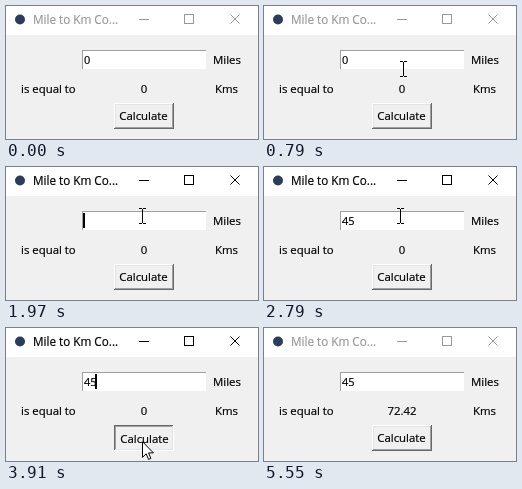
An HTML page for the animation above (5.67 s loop, 252x133 px).

```html
<!DOCTYPE html>
<html lang="en">
<head>
<meta charset="utf-8">
<title>Mile to Km Converter</title>
<style>
  html, body { margin: 0; width: 100%; height: 100%; overflow: hidden; background: #f0f0f0; }
  svg { display: block; width: 100vw; height: 100vh; }
  text { font: 11.4px "Open Sans", "Noto Sans", sans-serif; fill: #000; stroke: #000; stroke-width: .2px; }
  .mid { text-anchor: middle; }
  #bar { --ink: #999; }
  #bar.active { --ink: #000; }
  #bar text { font-size: 11.7px; fill: var(--ink); stroke: var(--ink); }
  #bar path { fill: none; stroke: var(--ink); }
  #entry { font-size: 11px; }
  #button { --light: #fff; --soft: #e3e3e3; --shade: #a0a0a0; --dark: #696969; }
  #button.down { --light: #696969; --soft: #a0a0a0; --shade: #e3e3e3; --dark: #fff; }
  #button path { fill: none; }
  #button.down text { transform: translate(1px, 1px); }
</style>
</head>
<body>
<svg viewBox="0 0 252 133" shape-rendering="crispEdges">
  <rect width="252" height="133" fill="#f0f0f0"/>
  <g id="bar">
    <rect width="252" height="29" fill="#fff"/>
    <circle cx="14" cy="13.5" r="5" fill="#2c3d5c" shape-rendering="auto"/>
    <text x="27" y="18">Mile to Km Co...</text>
    <path d="M133 13.5h10M178.5 8.5h9v9h-9z"/>
    <path d="M224.5 8.5l9 9m0-9l-9 9" shape-rendering="auto"/>
  </g>

  <rect x="76" y="44" width="124" height="19" fill="#fff"/>
  <path d="M76.5 63V44.5H200" fill="none" stroke="#a0a0a0"/>
  <text id="entry" x="78" y="58"></text>
  <rect id="caret" y="46" width="2" height="15"/>

  <text x="207" y="58">Miles</text>
  <text x="15" y="87">is equal to</text>
  <text id="result" class="mid" x="138" y="87"></text>
  <text x="209" y="87">Kms</text>

  <g id="button">
    <path d="M108.5 123V97.5H168" stroke="var(--light)"/>
    <path d="M109.5 122V98.5H167" stroke="var(--soft)"/>
    <path d="M109 121.5H166.5V98" stroke="var(--shade)"/>
    <path d="M108 122.5H167.5V97" stroke="var(--dark)"/>
    <text class="mid" x="137.5" y="114">Calculate</text>
  </g>

  <path id="arrow" d="M.5 .7V16.3L4.2 12.8L6.6 18.4L8.9 17.4L6.5 11.9H11.4Z"
        fill="#fff" stroke="#000" shape-rendering="auto"/>
  <path id="beam" d="M-4 -7.5h3m1 0h3M-.5 -7V7M-4 7.5h3m1 0h3" fill="none" stroke="#000"/>
</svg>
<script>
const LOOP = 5670;
const $ = id => document.getElementById(id);
const easeOut = u => 1 - (1 - u) ** 3;
const easeIn = u => u * u;

// pointer strokes; the first begins and the last ends below the window
const home = { x: 200, y: 137 };
const strokes = [
  { from: 240, to: 790, x: 140, y: 63, ease: easeOut },
  { from: 810, to: 1000, x: 137, y: 52, ease: easeOut },
  { from: 1440, to: 1560, x: 137, y: 49, ease: easeOut },
  { from: 2960, to: 2970, x: 137, y: 47, ease: easeOut },
  { from: 3305, to: 3730, x: 136, y: 113, ease: easeOut },
  { from: 4640, to: 5170, x: 210, y: 136, ease: easeIn }
];

function pointer(t) {
  let { x, y } = home;
  for (const s of strokes) {
    const u = Math.min(1, Math.max(0, (t - s.from) / (s.to - s.from)));
    x += (s.x - x) * s.ease(u);
    y += (s.y - y) * s.ease(u);
  }
  return [Math.round(x), Math.round(y)];
}

function entryText(t) {
  if (t < 1970) return "0";
  return "45".slice(0, Math.max(0, Math.floor((t - 2160) / 210)));
}

const caretOn = t => t >= 990 && t < 5500 && (t - 990) % 905 < 600;

const show = (el, on) => el.setAttribute("visibility", on ? "visible" : "hidden");

function draw(t) {
  const text = entryText(t);
  $("entry").textContent = text;
  $("caret").setAttribute("x", 77 + 6 * text.length);
  show($("caret"), caretOn(t));

  $("bar").classList.toggle("active", t >= 1000 && t < 5550);
  $("button").classList.toggle("down", t >= 3910 && t < 3990);
  $("result").textContent = t < 4010 ? "0" : (45 * 1.60934).toFixed(2);

  const [x, y] = pointer(t);
  const inEntry = y <= 63;
  for (const id of ["arrow", "beam"]) {
    $(id).setAttribute("transform", `translate(${x} ${y})`);
    show($(id), inEntry === (id === "beam"));
  }
}

const start = performance.now();
function tick() {
  draw((performance.now() - start) % LOOP);
  requestAnimationFrame(tick);
}
tick();
</script>
</body>
</html>
```
